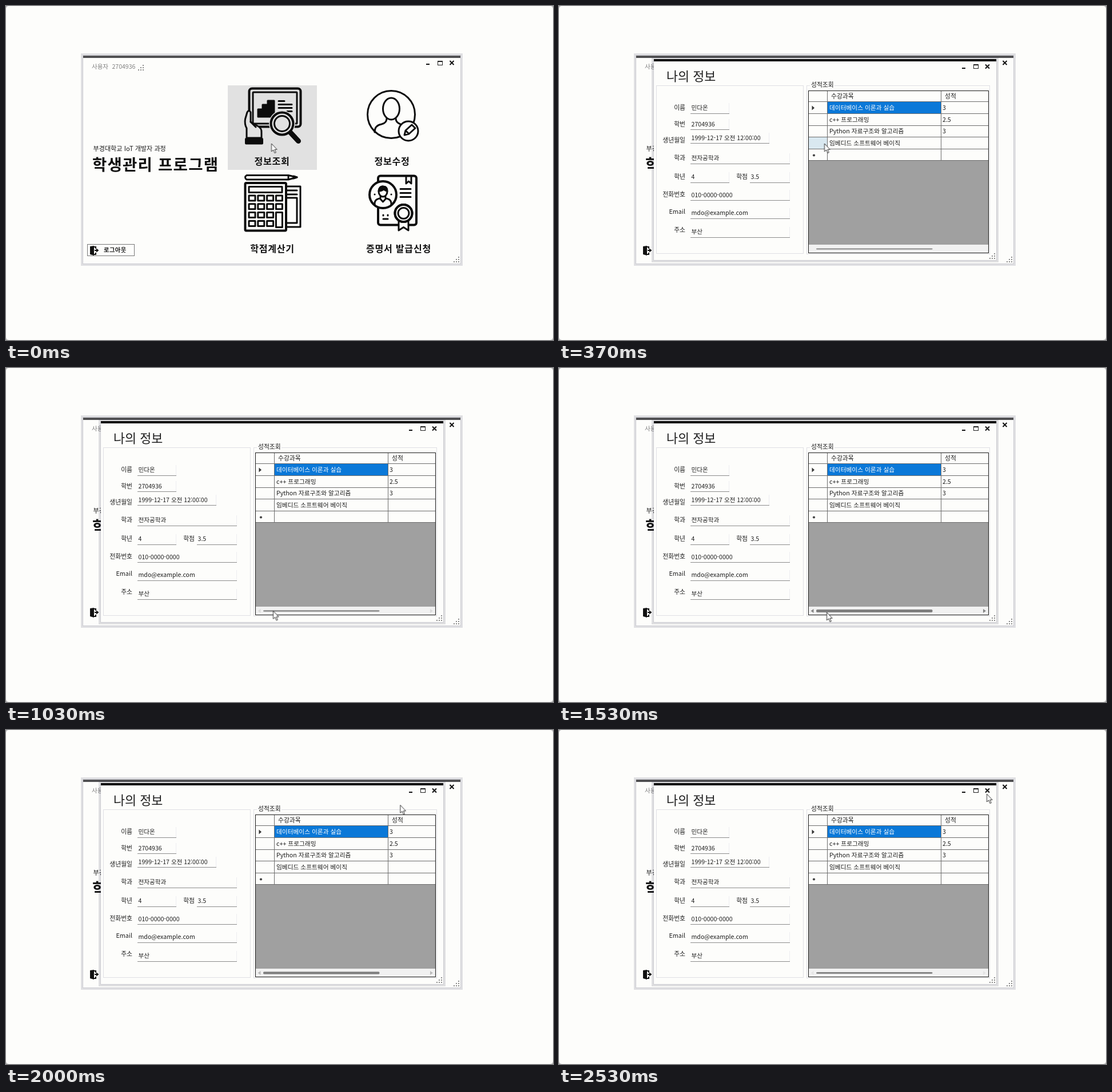
An HTML page that plays this animation: 957x585 px, repeating every 2.59 s.

```html
<!DOCTYPE html>
<html lang="ko">
<head>
<meta charset="utf-8">
<title>학생관리 프로그램</title>
<style>
html, body { margin: 0; width: 100%; height: 100%; overflow: hidden; background: #bbb; }
svg { display: block; width: 957px; height: 585px; }
text { font-family: "Noto Sans CJK KR", "Noto Sans CJK", "Open Sans", sans-serif; white-space: pre; }
.bold { font-weight: 700; letter-spacing: .045em; }
.crisp { shape-rendering: crispEdges; }
.icon { fill: none; stroke: #0c0c0c; stroke-width: 4; stroke-linejoin: round; stroke-linecap: round; }
.icon .solid { fill: #0c0c0c; }
.icon .paper { fill: #fdfdfb; }
.icon .thin { stroke-width: 3; }
#child, #content, #rowHover, #thumb, #arrows, #cursor, #focus { animation: 2590ms linear infinite; }
#child { animation-name: child; animation-timing-function: step-end; }
#focus { animation-name: focus; animation-timing-function: step-end; }
#content { animation-name: content; animation-timing-function: step-end; }
#rowHover { animation-name: rowHover; animation-timing-function: step-end; }
#thumb { animation-name: thumb; transform-origin: 0 425.5px; }
#arrows { animation-name: arrows; }
#cursor { animation-name: cursor; }
@keyframes child { 0% { opacity: 0 } 7.72%, 100% { opacity: 1 } }
@keyframes focus { 0% { opacity: 1 } 7.72%, 100% { opacity: 0 } }
@keyframes content { 0% { opacity: 0 } 12.74%, 100% { opacity: 1 } }
@keyframes rowHover {
  0% { opacity: 1; transform: none }
  29.73% { opacity: 1; transform: translateY(20.5px) }
  31.66%, 100% { opacity: 0; transform: none }
}
@keyframes thumb {
  0%, 38.6% { transform: scaleY(.36) }
  47.5%, 73.4% { transform: scaleY(1) }
  84.9%, 100% { transform: scaleY(.55) }
}
@keyframes arrows {
  0%, 37.5% { opacity: 0 }
  39.77% { opacity: .2 }
  47.5%, 73.4% { opacity: 1 }
  77.22% { opacity: .5 }
  84.9%, 100% { opacity: .12 }
}
@keyframes cursor {
  0%, 27.03% { transform: translate(464.5px, 241px); animation-timing-function: ease-in-out }
  38.6%, 43.6% { transform: translate(467.5px, 425.5px) }
  59.07%, 64.1% { transform: translate(468.5px, 428px); animation-timing-function: ease-in }
  77.22% { transform: translate(689.5px, 131.5px); animation-timing-function: ease-out }
  92.66%, 100% { transform: translate(748.5px, 112px) }
}
</style>
</head>
<body>
<svg id="stage" viewBox="0 0 957 585"></svg>
<script>
const WHITE = '#fdfdfb';

const rect = (x, y, w, h, fill, extra = '') =>
  `<rect class="crisp" x="${x}" y="${y}" width="${w}" height="${h}" fill="${fill}" ${extra}/>`;
const frame = (x, y, w, h, color) =>
  rect(x + .5, y + .5, w - 1, h - 1, 'none', `stroke="${color}"`);
const path = (d, cls = '') => `<path class="${cls}" d="${d}"/>`;
const box = (x, y, w, h, r = 0, cls = '') =>
  `<rect class="${cls}" x="${x}" y="${y}" width="${w}" height="${h}" rx="${r}"/>`;
const ring = (x, y, r, cls = '') => `<circle class="${cls}" cx="${x}" cy="${y}" r="${r}"/>`;

// cy is the middle of the line of text
const text = (x, cy, str, { size = 10.8, fill = '#1c1c1c', cls = '', anchor = 'start' } = {}) =>
  `<text class="${cls}" x="${x}" y="${cy + size * .37}" font-size="${size}" fill="${fill}" text-anchor="${anchor}">${str}</text>`;

const grip = (x, y) => [[0, 8], [4, 8], [8, 8], [4, 4], [8, 4], [8, 0]]
  .map(([dx, dy]) => rect(x + dx, y + dy, 2, 2, '#8a8a8a')).join('');

// Caption buttons, placed by the close cross
const minimise = (x, y) => rect(x - 45, y + 1.5, 6, 2, '#111');
const maximise = (x, y) => frame(x - 25, y - 4, 9, 8, '#222') + rect(x - 25, y - 4, 9, 2, '#222');
const close = (x, y) =>
  `<path d="M${x - 3.5} ${y - 3.5}l7 7m0-7l-7 7" stroke="#111" stroke-width="2"/>`;
const caption = (x, y) => minimise(x, y) + maximise(x, y) + close(x, y);

// White pane inside a see-through shadow
const shell = (x, y, w, h) =>
  rect(x - 2, y - 2, w + 4, h + 4, 'none', 'stroke="#303048" stroke-opacity=".14" stroke-width="4"') +
  rect(x - .5, y - .5, w + 1, h + 1, 'none', 'stroke="#303048" stroke-opacity=".1"') +
  rect(x, y, w, h, WHITE);

const reportIcon = () => `<g class="icon">
  ${box(425.5, 144.5, 90, 67, 5)}${box(432, 151, 77, 55, 1, 'thin')}
  ${path('M441 194v-13h8v-8h9v-7h11v28z', 'solid thin')}
  ${path('M477 166.5h10M477 172.5h23M477 178.5h23M492 184.5h8', 'thin')}
  <g fill="#e1e1e1">
    ${path('M421 231V214Q417 207 418.5 198L422 186Q425 181 428 186V203L440 210Q448 214 447 222V231z', 'thin')}
    ${path('M428 203l9 9', 'thin')}
    <circle cx="483" cy="206" r="23" stroke="none"/>
  </g>
  ${box(420, 233, 28, 7.5, 0, 'solid')}
  ${ring(483, 206, 19.5)}${ring(483, 206, 13.5, 'thin')}
  <path d="M498 222l13.5 14.5" stroke-width="9"/>
</g>`;

const profileIcon = () => `<g class="icon">
  ${ring(674, 190, 41.5, 'thin')}
  <ellipse class="thin" cx="674" cy="180" rx="14.5" ry="19"/>
  ${path('M645 221Q645 209 657 207Q666 205 666 197M682 197Q682 204 690 207', 'thin')}
  ${ring(704, 219, 17, 'paper thin')}
  ${path('M697 226l2-8 11-10 6 6-11 10zM699 218l6 6', 'thin')}
</g>`;

const calculatorIcon = () => {
  let keys = '';
  for (let row = 0; row < 4; row++)
    for (let col = 0; col < 4; col++)
      if (col < 3 || row < 2) keys += box(425 + 15.8 * col, 332 + 14.8 * row, 11, 9, 0, 'thin');
  return `<g class="icon">
    ${path('M421 296.5H494L509 300L494 304H421Q416 300 421 296.5zM494 297v7', 'thin')}
    ${path('M503 298l6 2-6 2z', 'solid thin')}
    ${path('M491 316h24v71h-24', 'thin')}
    ${path('M491 323h18M491 330h18M491 336h18v44h-18', 'thin')}
    ${box(418.5, 310, 71.5, 83.5, 2, 'paper')}${box(425, 316.5, 58, 10, 0, 'thin')}
    ${keys}${box(472.4, 361.6, 11, 26, 0, 'thin')}
  </g>`;
};

const certificateIcon = () => `<g class="icon">
  ${box(651, 297.5, 67, 86, 4)}
  ${path('M700 298v13l4.5-4 4.5 4v-13', 'thin')}
  ${path('M690 320.5h18M690 327.5h18M690 334.5h18', 'thin')}
  ${path('M660 366v1M668 366v1M660 373h8', 'thin')}
  ${ring(659.5, 330.5, 23.5, 'paper')}
  ${path('M645 348Q644 338 655 337V334M674 348Q675 338 664 337V334M655 338l4.5 5 4.5-5', 'thin')}
  <ellipse class="thin" cx="659.5" cy="325" rx="7.5" ry="9"/>
  ${path('M652 324Q653 315 660 316Q667 316 667 324Q662 323 661 320Q659 324 652 324z', 'solid thin')}
  ${path('M645 330h.1M674 330h.1', 'thin')}
  ${path('M687 375v18l8.5-5.5 8.5 5.5v-18', 'paper thin')}
  ${ring(695.5, 363, 15)}${ring(695.5, 363, 15, 'paper')}${ring(695.5, 363, 9.5, 'thin')}
</g>`;

const menuLabel = (x, y, str) => text(x, y, str, { size: 16.1, cls: 'bold', anchor: 'middle', fill: '#111' });

const mainWindow = () =>
  shell(135, 87, 660, 364) + rect(135, 87, 660, 4, '#505052') +
  text(150, 106, '사용자', { size: 10.5, fill: '#808080' }) +
  text(185.5, 106, '2704936', { size: 10.5, fill: '#808080' }) + grip(231, 103) +
  caption(780, 99.5) + grip(783, 439) +
  text(152.5, 250, '부경대학교 IoT 개발자 과정', { size: 11.1 }) +
  text(151, 278, '학생관리 프로그램', { size: 27.5, cls: 'bold', fill: '#111' }) +
  rect(388, 139, 156, 148, '#e1e1e1') +
  reportIcon() + profileIcon() + calculatorIcon() + certificateIcon() +
  menuLabel(465.5, 272, '정보조회') + menuLabel(675.5, 272, '정보수정') +
  menuLabel(466, 425.5, '학점계산기') + menuLabel(687, 425.5, '증명서 발급신청') +
  `<g id="focus">${frame(142, 417, 83, 21, '#777')}</g>` +
  '<path d="M147 421l7-1v1h4v4h-2v-2h-2v11h2v-2h2v4h-4v1l-7-2z" fill="#111"/>' +
  '<path d="M155 428h5m-2-2.5l3 2.5-3 2.5" fill="none" stroke="#111" stroke-width="1.8"/>' +
  text(171, 427.5, '로그아웃', { size: 10.3, cls: 'bold' });

// label, label y, value, value y, left, right, underline y
const fields = [
  ['이름', 178.5, '민다온', 178.5, 230, 298, 188],
  ['학번', 207, '2704936', 207, 230, 298, 216],
  ['생년월일', 235, '1999-12-17 오전 12:00:00', 231, 230, 368, 240],
  ['학과', 266, '전자공학과', 266, 230, 404, 276],
  ['학년', 299.5, '4', 299.5, 230, 298, 309],
  ['학점', 299.5, '3.5', 299.5, 334, 404, 309],
  ['전화번호', 330.5, '010-0000-0000', 331, 230, 404, 340],
  ['Email', 360, 'mdo@example.com', 362.5, 230, 404, 372],
  ['주소', 392.5, '부산', 395, 230, 404, 405],
];

const underlines = () => fields.map(([, , , , x, end, y]) => rect(x, y, end - x, 1, '#8c8c8c')).join('');
const fieldTexts = () => fields.map(([label, ly, value, vy, x, end, y]) =>
  rect(end - 1, y - 18, 1, 18, '#ececf0') +
  text(x === 230 ? 221 : 330, ly, label, { anchor: 'end' }) +
  text(x + 1.5, vy, value, { size: 10.6 })).join('');

const courses = [
  ['데이터베이스 이론과 실습', '3'],
  ['c++ 프로그래밍', '2.5'],
  ['Python 자료구조와 알고리즘', '3'],
  ['임베디드 소프트웨어 베이직', ''],
];

const grid = () =>
  rect(436, 148, 316, 285, '#a0a0a0') + rect(436, 148, 316, 123, WHITE) +
  `<g id="rowHover">${rect(437, 230, 33, 20, '#d9e8f0')}</g>` +
  rect(470, 168, 198, 20, '#0a78d8') +
  [167, 188, 209, 229, 250, 270].map(y => rect(436, y, 316, 1, '#6c6c6c')).join('') +
  [469, 668].map(x => rect(x, 148, 1, 123, '#6c6c6c')).join('') +
  text(476, 158, '수강과목') + text(675, 158, '성적') +
  courses.map(([name, grade], i) =>
    text(473, 178 + 20.6 * i, name, { size: 10.7, fill: i ? '#1c1c1c' : '#fff' }) +
    text(671, 178 + 20.6 * i, grade, { size: 10.6 })).join('') +
  '<path d="M442.5 174.5l4.5 4-4.5 4z" fill="#333"/>' +
  '<circle cx="446" cy="261.5" r="2.1" fill="#444"/>' +
  rect(437, 418, 314, 14, '#f1f1f1') +
  '<rect id="thumb" x="450" y="423" width="203.5" height="5" rx="2" fill="#7e7e7e"/>' +
  '<path id="arrows" d="M445.5 422v7l-5-3.5zM742 422v7l5-3.5z" fill="#858585"/>' +
  frame(436, 148, 316, 285, '#1a1a1a');

const childWindow = () =>
  shell(166, 94, 599, 351) + underlines() +
  `<g id="content">
    ${rect(166, 93, 599, 4, '#050505')}${caption(749.5, 106)}${grip(753, 433)}
    ${text(188, 123, '나의 정보', { size: 21.8 })}
    ${frame(170, 139, 258, 295, '#dfdfe4')}
    ${frame(433, 139, 321, 296, '#dfdfe4')}
    ${rect(439, 138, 43, 3, WHITE)}${text(441, 138.5, '성적조회')}
    ${fieldTexts()}${underlines()}${grid()}
  </g>`;

document.getElementById('stage').innerHTML =
  `<rect width="957" height="585" rx="5" fill="${WHITE}"/>` +
  mainWindow() + `<g id="child">${childWindow()}</g>` +
  '<path id="cursor" d="M0 0V14l3.2-3 2.4 5.6 2.2-1-2.3-5.3H9.6z" fill="#fff" stroke="#222" stroke-width=".95"/>';
</script>
</body>
</html>
```
